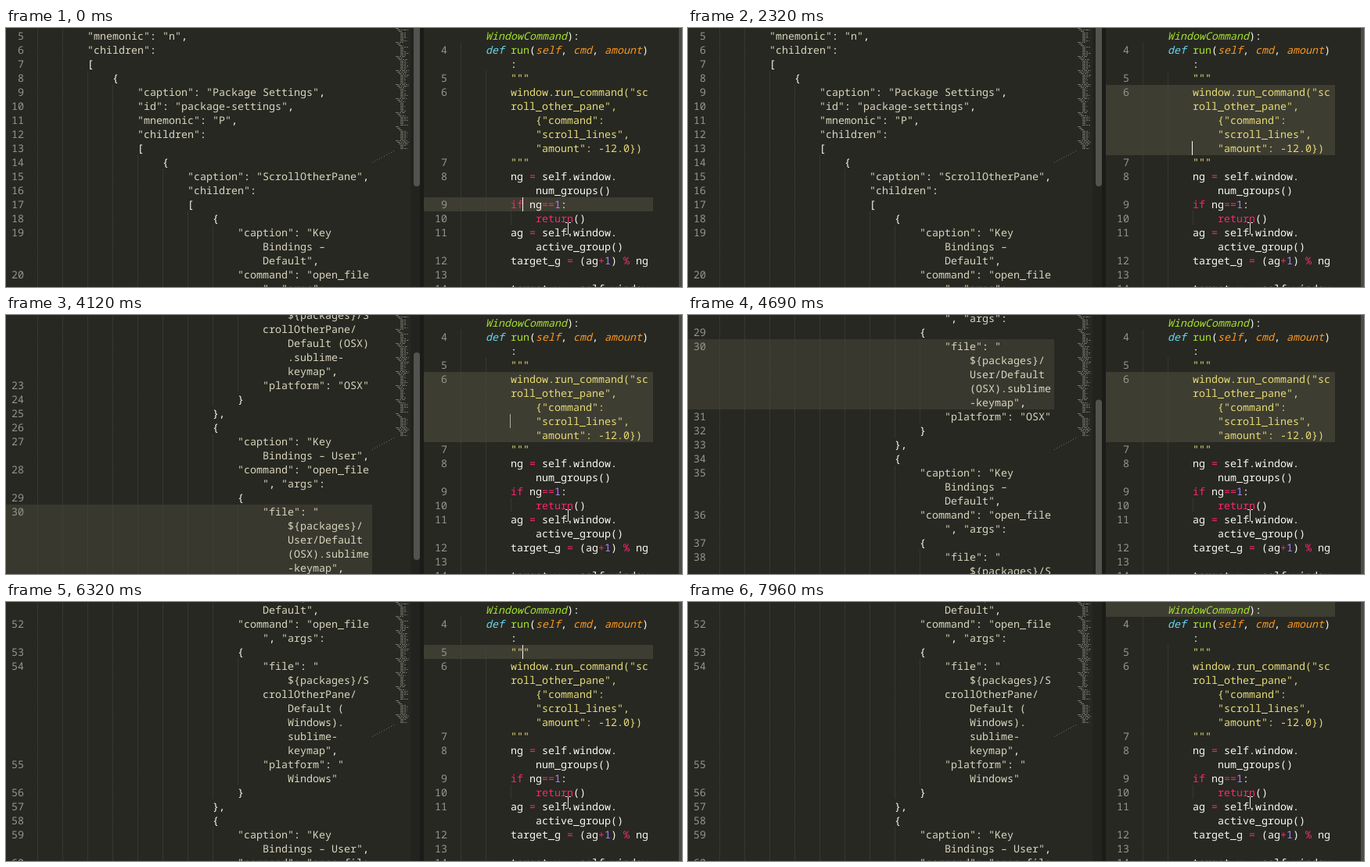
An HTML page that plays this animation: 864x332 px, repeating every 8000 ms.

```html
<!DOCTYPE html>
<html lang="en">
<head>
<meta charset="utf-8">
<title>Scrolling the other pane</title>
<style>
html, body { margin: 0; width: 100%; height: 100%; overflow: hidden; background: #272822; }
svg { display: block; width: 864px; height: 332px; }
text {
  font: 500 13.333px "Noto Sans Mono", "DejaVu Sans Mono", monospace;
  white-space: pre;
  text-rendering: geometricPrecision;
}
.num { fill: #94958e; text-anchor: end; }
.w { fill: #f8f8f2; }
.c { fill: #d9d6bd; }
.y { fill: #e6db74; }
.p { fill: #f92672; }
.v { fill: #ae81ff; }
.g { fill: #a6e22e; }
.G { fill: #a6e22e; font-style: italic; }
.b { fill: #66d9ef; font-style: italic; }
.o { fill: #fd971f; font-style: italic; }
.guide { stroke: #45463e; stroke-dasharray: 1 1; }
.map { stroke: #77776f; stroke-dasharray: 4 1 2 1; }
</style>
</head>
<body>
<svg id="stage" viewBox="0 0 864 332"></svg>
<script>
const LOOP = 8000, ROW = 18, TAB = 32, CHAR = 8;
const stage = document.getElementById('stage');

function add(parent, tag, attrs = {}, text) {
  const el = document.createElementNS('http://www.w3.org/2000/svg', tag);
  set(el, attrs);
  if (text !== undefined) el.textContent = text;
  parent.append(el);
  return el;
}
function set(el, attrs) {
  for (const key in attrs) el.setAttribute(key, attrs[key]);
}
const rect = (parent, x, y, width, height, fill, rx = 0) =>
  add(parent, 'rect', { x, y, width, height, fill, rx });
const line = (parent, x1, y1, x2, y2, attrs) =>
  add(parent, 'line', { x1, y1, x2, y2, ...attrs });
const rowTop = row => 1 + ROW * row;

// Draws numbered lines; rows starting with ">" are wrapped one tab deeper.
function drawPane(parent, lines, { origin, numX, num, row, colour }) {
  const layout = [];
  for (const { level, rows } of lines) {
    const start = row, count = rows.length;
    add(parent, 'text', { x: numX, y: rowTop(row) + 14, class: 'num' }, num);
    for (const str of rows) {
      const top = rowTop(row), deep = str[0] === '>';
      const x = origin + (level + deep) * TAB;
      for (let i = 0; i < level; i++) {
        const gx = origin + i * TAB + 0.5;
        line(parent, gx, top, gx, top + ROW, { class: 'guide' });
      }
      const el = add(parent, 'text', { x, y: top + 14 });
      for (const [cls, part] of colour(deep ? str.slice(1) : str))
        add(el, 'tspan', { class: cls }, part);
      layout.push({ num, row: row++, start, count, x, end: x + el.textContent.length * CHAR });
    }
    num++;
  }
  return layout;
}

/* Left pane: menu file */
const menu = [];
const put = (level, ...rows) => menu.push({ level, rows });

function entry(title, file, platform) {
  put(7, '{');
  put(8, '"caption": "Key', ...title);
  put(8, '"command": "open_file', '>", "args":');
  put(8, '{');
  put(9, '"file": "', ...file);
  put(9, ...platform);
  put(8, '}');
  put(7, '},');
}
const defaults = ['>Bindings –', '>Default",'];
const user = ['>Bindings – User",'];
const pack = ['>${packages}/S', 'crollOtherPane/'];
const own = ['>${packages}/', '>User/Default'];
const mac = ['"platform": "OSX"'];

put(2, '"mnemonic": "n",');
put(2, '"children":');
put(2, '[');
put(3, '{');
put(4, '"caption": "Package Settings",');
put(4, '"id": "package-settings",');
put(4, '"mnemonic": "P",');
put(4, '"children":');
put(4, '[');
put(5, '{');
put(6, '"caption": "ScrollOtherPane",');
put(6, '"children":');
put(6, '[');
entry(defaults, [...pack, '>Default (OSX)', '>.sublime-', '>keymap",'], mac);
entry(user, [...own, '>(OSX).sublime', '>-keymap",'], mac);
for (const os of ['Linux', 'Windows']) {
  const tail = ['>sublime-', '>keymap",'];
  const platform = ['"platform": "', `>${os}"`];
  entry(defaults, [...pack, '>Default (', `>${os}).`, ...tail], platform);
  entry(user, [...own, `>(${os}).`, ...tail], platform);
}

const colourJson = str => str.split(/(^[\[\]{}],?$|(?<=")[:,])/)
  .filter(Boolean)
  .map(s => [/^[\[\]{}:,]+$/.test(s) ? 'w' : 'c', s]);

const left = add(stage, 'g');
const menuRows = drawPane(left, menu,
  { origin: 40, numX: 23, num: 5, row: 0, colour: colourJson });
const active = menuRows.find(r => r.num === 30);
left.prepend(rect(left, 0, rowTop(active.row), 468, active.count * ROW, '#38382f'));

/* Minimap, scroll bar, pane divider */
for (let i = 0; i < 78; i++) {
  const noise = Math.abs(Math.sin(i * 12.9898) * 43758.5453) % 1;
  const x = 498 + 2 * Math.min(i % 9, 3);
  line(stage, x, i * 2 + 0.5, x + 4 + noise * (511 - x), i * 2 + 0.5, { class: 'map' });
}
line(stage, 468, 172.5, 498, 156.5, { stroke: '#77776f', 'stroke-dasharray': '1 2.4' });
rect(stage, 517, 0, 12, 332, '#22231e');
const thumb = rect(stage, 521, 0, 8, 266, '#52534e', 4);
rect(stage, 529, 0, 5, 332, '#1b1c18');

/* Right pane: parts split by "|", each led by its colour class */
const code = [
  [0, '', '>GWindowCommand|w):'],
  [1, 'bdef|w |grun|w(|oself|w, |ocmd|w, |oamount|w)', '>w:'],
  [2, 'y"""'],
  [2, 'ywindow.run_command("sc', 'yroll_other_pane",', '>y{"command":',
    '>y"scroll_lines",', '>y"amount": -12.0})'],
  [2, 'y"""'],
  [2, 'wng |p=|w self.window.', '>wnum_groups()'],
  [2, 'pif|w ng|p==|v1|w:'],
  [3, 'preturn|w()'],
  [2, 'wag |p=|w self.window.', '>wactive_group()'],
  [2, 'wtarget_g |p=|w (ag|p+|v1|w) |p%|w ng'],
  [2, ''],
  [2, 'wtarget_v |p=|w self.window.'],
].map(([level, ...rows]) => ({ level, rows }));
const colourCode = str => str.split('|').map(part => [part[0], part.slice(1)]);

const right = add(stage, 'g');
const band = rect(right, 534, 0, 293, ROW, '#3e3d32');
const codeRows = drawPane(right, code,
  { origin: 581, numX: 564, num: 3, row: -1, colour: colourCode });
const caret = rect(right, 0, 0, 1, ROW, '#f8f8f0');
rect(stage, 860, 0, 4, 332, '#4b4c47');

// Mouse pointer
add(stage, 'path', {
  d: 'M715 249.5h2.5l1 1 1-1h2.5M718.5 250v14M715 264.5h2.5l1-1 1 1h2.5',
  fill: 'none', stroke: '#e8e8e8',
});

/* Motion: each key press moves the caret up one row from row 12 */
const presses = [-130, 960, 1380, 1930, 2320, 2740, 5400, 5800, 6070, 6320, 6740, 7140, 7410];
const BLINK = 1100;

function blink(age) {
  const phase = age % BLINK;
  return phase < 280 ? 1 : phase < 430 ? 0.6 : 0;
}
// Share of n equal hops done, the first one at start
const hops = (t, start, n, gap) =>
  Math.min(n, Math.max(0, Math.floor((t - start) / gap) + 1)) / n;
const easeOut = s => 1 - (1 - s) ** 3.3;

function draw(now) {
  const t = now % LOOP;
  const moves = presses.findLastIndex(time => time <= t);
  const here = codeRows.find(r => r.row === 12 - moves);
  set(caret, {
    x: here.x > 660 ? 644 : Math.min(660, here.end - 1),
    y: rowTop(here.row),
    opacity: blink(t - presses[moves]),
  });
  set(band, { y: rowTop(here.start), height: here.count * ROW });

  const rows = 24 * easeOut(hops(t, 4120, 2, 130)) + 56 * hops(t, 4690, 6, 142);
  const offset = Math.round(rows * ROW);
  set(left, { transform: `translate(0 ${-offset})` });
  set(thumb, { y: -63 + offset * 0.286 });
}

const origin = performance.now();
function frame() {
  draw(performance.now() - origin);
  requestAnimationFrame(frame);
}
frame();
</script>
</body>
</html>
```
